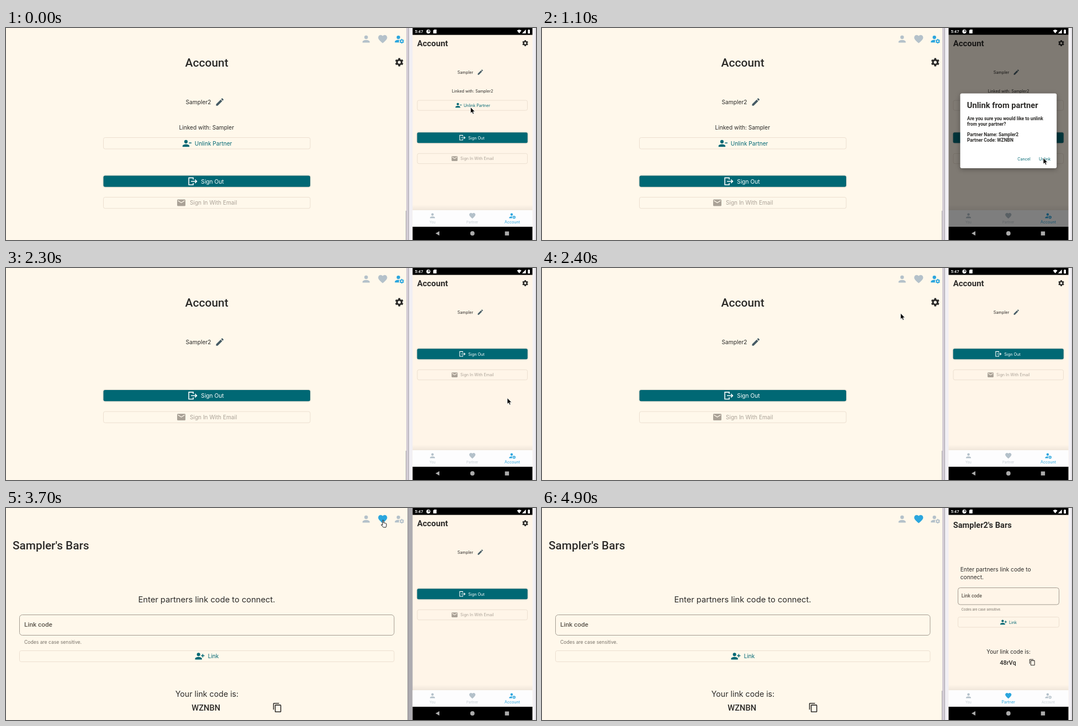
Write an HTML page that moves like this. It is 960x384 px and loops after 5.77 s.

```html
<!DOCTYPE html>
<html lang="en">
<head>
<meta charset="utf-8">
<title>Unlinking a partner</title>
<style>
  html, body { margin: 0; width: 100%; height: 100%; overflow: hidden; background: #fff8eb; }
  svg { display: block; width: 960px; height: 384px; }
  .body { font-family: Inter, "Open Sans", sans-serif; }
  .head { font-family: Roboto, Arial, sans-serif; }
  .raised { filter: drop-shadow(0 .8px .8px rgba(0, 0, 0, .3)); }
  .dialog { filter: drop-shadow(0 2px 4px rgba(0, 0, 0, .35)); }
</style>
</head>
<body>
<svg id="stage" viewBox="0 0 960 384"></svg>
<script>
const LOOP = 5770, STEP = 100;
const INK = '#2c2b29', TEAL = '#006874', BLUE = '#2ba6de', IDLE = '#b4c1ca', MUTED = '#aaa297';
const LEFT_NAME = 'Sampler2', PHONE_NAME = 'Sampler';

const path = d => `<path fill-rule="evenodd" d="${d}"/>`;
const gear = (x, y, k) => {
  const teeth = [0, 60, 120, 180, 240, 300].map(a =>
    `<rect x="-2.4" y="-10" width="4.8" height="4" rx=".6" transform="rotate(${a})"/>`).join('');
  return `<g transform="translate(${x} ${y}) scale(${k})">${teeth}
    <circle r="5.6" fill="none" stroke="currentColor" stroke-width="4.2"/></g>`;
};

// Icons live on a 24 unit grid
const ICONS = {
  person: path('M12 4a4 4 0 0 1 0 8 4 4 0 0 1 0-8zM12 14c4.42 0 8 1.79 8 4v2H4v-2c0-2.21 3.58-4 8-4z'),
  heart: path('M12 21.35l-1.45-1.32C5.4 15.36 2 12.27 2 8.5 2 5.41 4.42 3 7.5 3c1.74 0 3.41.81 4.5 2.08C13.09 3.81 14.76 3 16.5 3 19.58 3 22 5.41 22 8.5c0 3.77-3.4 6.86-8.55 11.53z'),
  account: path('M10 4a4 4 0 0 1 0 8 4 4 0 0 1 0-8zM10 14c.8 0 1.5 0 2.2.2a6 6 0 0 0-.4 5.8H2v-2c0-2.2 3.6-4 8-4z') + gear(17.8, 17, .52),
  gear: gear(12, 12, 1),
  pencil: path('M20.71 7.04c.39-.39.39-1.04 0-1.41l-2.34-2.34c-.37-.39-1.02-.39-1.41 0l-1.84 1.83 3.75 3.75zM3 17.25V21h3.75L17.81 9.93l-3.75-3.75z'),
  mail: path('M20 8l-8 5-8-5V6l8 5 8-5zM20 4H4a2 2 0 0 0-2 2v12a2 2 0 0 0 2 2h16a2 2 0 0 0 2-2V6a2 2 0 0 0-2-2z'),
  minus: path('M14 8a4 4 0 1 0-8 0 4 4 0 0 0 8 0zM17 10v2h6v-2zM2 18v2h16v-2c0-2.66-5.33-4-8-4s-8 1.34-8 4z'),
  plus: path('M13 8a4 4 0 1 0-8 0 4 4 0 0 0 8 0zM15 10v2h3v3h2v-3h3v-2h-3V7h-2v3zM1 18v2h16v-2c0-2.66-5.33-4-8-4s-8 1.34-8 4z'),
  logout: '<path fill="none" stroke="currentColor" stroke-width="2" d="M13 8V4H3v16h10v-4M8 12h13M17 8l4 4-4 4"/>',
  copy: path('M19 21H8V7h11zM19 5H8a2 2 0 0 0-2 2v14a2 2 0 0 0 2 2h11a2 2 0 0 0 2-2V7a2 2 0 0 0-2-2zM16 1H4a2 2 0 0 0-2 2v14h2V3h12z')
};

const icon = (name, x, y, size, color, id = '') =>
  `<g ${id && `id="${id}"`} style="color:${color}" fill="currentColor"
    transform="translate(${x - size / 2} ${y - size / 2}) scale(${size / 24})">${ICONS[name]}</g>`;

const text = (str, x, y, size, { color = INK, anchor = 'start', font = 'body', weight = 400, id = '' } = {}) =>
  `<text ${id && `id="${id}"`} class="${font}" x="${x}" y="${y}" font-size="${size}" font-weight="${weight}"
    text-anchor="${anchor}" fill="${color}">${str}</text>`;
const mid = (str, x, y, size, opts) => text(str, x, y, size, { anchor: 'middle', ...opts });
const head = (str, x, y, size, weight = 500, opts) => text(str, x, y, size, { font: 'head', weight, ...opts });

const rect = (x, y, w, h, fill, extra = '') =>
  `<rect x="${x}" y="${y}" width="${w}" height="${h}" fill="${fill}" ${extra}/>`;
const outline = (x, y, w, h, color = '#ecdfd0', r = 3) =>
  rect(x, y, w, h, 'none', `rx="${r}" stroke="${color}"`);
const group = (id, content, extra = '') => `<g id="${id}" ${extra}>${content}</g>`;

const leftAccount = group('leftAccount',
  head('Account', 324.5, 70, 21) + icon('gear', 712.3, 62, 18, INK) +
  mid(LEFT_NAME, 348.5, 137.8, 10.2) + icon('pencil', 387.3, 134, 18, '#455a64') +
  group('leftLinked',
    mid(`Linked with: ${PHONE_NAME}`, 363.3, 183.8, 10.1) +
    outline(176.5, 198.5, 374.5, 20.5) + icon('minus', 327.5, 209, 18.5, TEAL) +
    mid('Unlink Partner', 375.5, 212.8, 10.1, { color: TEAL })) +
  group('leftButtons',
    rect(176.5, 267.5, 374.5, 20.3, TEAL, 'rx="3" class="raised"') +
    icon('logout', 338.3, 277.7, 19, '#fff') + mid('Sign Out', 374, 281.7, 10.2, { color: '#fff' }) +
    outline(176.5, 306.5, 374.5, 20.3) + icon('mail', 317.5, 316.6, 18, MUTED) +
    mid('Sign In With Email', 375.7, 320.4, 10.1, { color: MUTED })));

const leftPartner = group('leftPartner',
  head(`${PHONE_NAME}'s Bars`, 12, 75, 20.8) +
  mid('Enter partners link code to connect.', 363.5, 170.6, 14.7) +
  outline(24.5, 193.5, 678.5, 37, '#a29b90', 5) + head('Link code', 33, 215.3, 11.8, 500, { color: '#5d574e' }) +
  text('Codes are case sensitive.', 33, 246, 8.6, { color: '#787269' }) +
  outline(24.5, 258.5, 678.5, 20) + icon('plus', 351, 268.3, 18.5, TEAL) +
  mid('Link', 375.5, 272.1, 10.1, { color: TEAL }) +
  mid('Your link code is:', 364, 341.8, 14.2) +
  head('WZNBN', 362.3, 366.7, 14.7, 500, { anchor: 'middle' }) + icon('copy', 491.5, 361.5, 18.5, INK));

const leftNav =
  '<clipPath id="bar"><rect width="726" height="41"/></clipPath>' +
  group('hover', '<circle cx="682.5" cy="20" r="25.5" fill="#000" opacity=".035"/>', 'clip-path="url(#bar)"') +
  icon('person', 652.3, 20, 19.5, IDLE) + icon('heart', 682.3, 20, 19.5, IDLE, 'leftHeart') +
  icon('account', 712.3, 20, 19, BLUE, 'leftCog');

const frameEdges =
  group('restEdge',
    rect(725, 0, 12, 384, '#f1eff4') + rect(725, 0, 4.5, 384, '#d3ccd5') +
    rect(729, 0, 1, 384, '#aaa5ae') + rect(724, 331, 1, 53, '#aaa')) +
  group('focusEdge', rect(727.5, 0, 9.5, 384, '#adabb0') + rect(727.5, 0, 1.2, 384, '#8f8c92')) +
  rect(953.5, 0, 6.5, 384, '#f3f1f5') + rect(958.5, 0, 1.5, 384, '#dedbe1');

const phoneAccount = group('phoneAccount',
  head('Account', 744.8, 32.5, 14.9, 700) + icon('gear', 940.5, 27.5, 13, INK) +
  mid(PHONE_NAME, 832, 82.6, 7.3) + icon('pencil', 859.2, 80, 12.5, '#455a64') +
  group('phoneLinked',
    mid(`Linked with: ${LEFT_NAME}`, 845, 116.9, 7.15) +
    outline(745, 131, 199.5, 18.2) + icon('minus', 819.5, 140, 13, TEAL) +
    mid('Unlink Partner', 853, 142.7, 7.15, { color: TEAL }) +
    rect(745, 131, 199.5, 18.2, TEAL, 'id="unlinkPress" rx="3" opacity="0"')) +
  group('phoneButtons',
    rect(744.7, 189.3, 200, 18.9, TEAL, 'rx="2.5" class="raised"') +
    icon('logout', 826.7, 198.7, 13, '#fff') + mid('Sign Out', 852, 201.5, 7.25, { color: '#fff' }) +
    outline(745, 227.3, 199.5, 18.4) + icon('mail', 812.5, 236.6, 13, MUTED) +
    mid('Sign In With Email', 853.3, 239.3, 7.15, { color: MUTED })));

const phonePartner = group('phonePartner',
  head(`${LEFT_NAME}'s Bars`, 744.8, 36.2, 14.6, 700) +
  text('Enter partners link code to', 757.7, 115, 10.25) + text('connect.', 757.7, 128.6, 10.25) +
  outline(753.5, 144.5, 183, 30.5, '#a29b90', 4) + head('Link code', 759.7, 162.4, 8.6, 500, { color: '#5d574e' }) +
  text('Codes are case sensitive.', 759.7, 185.7, 5.95, { color: '#787269' }) +
  outline(753.5, 197.5, 183, 18.5) + icon('plus', 836, 206.8, 13, TEAL) +
  mid('Link', 853, 209.5, 7.15, { color: TEAL }) +
  mid('Your link code is:', 845, 263.5, 9.9) +
  head('48rVq', 844, 283.8, 11, 500, { anchor: 'middle' }) + icon('copy', 888, 279.5, 12.5, INK));

const phoneNav =
  '<linearGradient id="shade" x2="0" y2="1"><stop stop-opacity="0"/><stop offset="1" stop-opacity=".06"/></linearGradient>' +
  rect(736.5, 320, 217, 10, 'url(#shade)') + rect(736.5, 330, 217, 30, '#fdfdfe') +
  '<circle id="tabPress" cx="844.5" cy="345" r="14" fill="#2ba6de" opacity="0"/>' +
  icon('person', 772.5, 340, 13.5, IDLE) + mid('You', 772.5, 354, 6.1, { color: '#c3ccd2' }) +
  icon('heart', 844.7, 340, 13.5, IDLE, 'phoneHeart') + mid('Partner', 844.7, 354, 6.1, { id: 'partnerLabel' }) +
  icon('account', 917, 340, 13.5, BLUE, 'phoneCog') + mid('Account', 917, 354, 7.1, { id: 'accountLabel' });

const dialogLines = [
  ['Are you sure you would like to unlink', 166.6], ['from your partner?', 176.6],
  [`Partner Name: ${LEFT_NAME}`, 196.2], ['Partner Code: WZNBN', 205.7]
].map(([str, y]) => head(str, 770, y, 8.4, 700)).join('');
const dialog = group('dialog',
  rect(736.5, 12.5, 217, 347.5, '#000', 'opacity=".5"') +
  rect(757.5, 118.5, 174.7, 135.5, '#fff', 'rx="3" class="dialog"') +
  head('Unlink from partner', 769.8, 144.8, 14.7, 700) + dialogLines +
  '<circle id="confirmPress" cx="910.5" cy="237.5" r="10" fill="#006874" opacity="0"/>' +
  mid('Cancel', 873, 239.8, 7.2, { color: TEAL }) + mid('Unlink', 910.7, 239.8, 7.2, { color: TEAL }));

const systemBars =
  rect(736.5, 0, 217, 12.5, '#000') + rect(736.5, 360, 217, 24, '#000') +
  head('5:47', 740.5, 9.2, 7.6, 500, { color: '#fff' }) +
  '<circle cx="765" cy="6.3" r="3.6" fill="#fff"/><path d="M765 4v2.6h2.4a2.4 2.4 0 0 0-2.4-2.6z"/>' +
  '<path fill="#fff" d="M775.6 2.8h4.2v7h-6V4.6zM925.6 4.4q4-3 8 0l-4 5.4zM941.7 2.8v7h-7zM945.2 3.6h1v-.9h1.8v.9h1v6.3h-3.8z"/>' +
  '<path fill="#aaa" d="M785 368v8l-7-4zM903.7 368.4h7.4v7.4h-7.4z"/><circle cx="844.8" cy="372" r="3.9" fill="#aaa"/>';

const cursors =
  group('arrow', '<path d="M0 0V10.8L2.5 8.6 4.2 12.4 6 11.6 4.4 7.9H7.8Z" stroke="#fff" stroke-width=".7"/>') +
  group('hand', '<path d="M-1 9V1Q-1 0 0 0T1 1V5Q2 4.3 3 5.3 4 4.8 4.6 5.9 6 5.5 6 7V10Q6 11.5 5 13H.5L-3.5 8.5Q-3 7-1 9Z" fill="#fff" stroke="#000" stroke-width=".9"/>');

document.getElementById('stage').innerHTML =
  rect(0, 0, 960, 384, '#fff8eb') + leftNav + leftAccount + leftPartner + frameEdges +
  rect(736.5, 0, 217, 384, '#fff5e8') + phoneAccount + phonePartner + phoneNav + dialog + systemBars + cursors;

// Each track is a list of [time, ...value] that holds until the next entry
const CURSOR = [
  [0, 841.5, 143.5, 'arrow'], [800, 856, 164, 'arrow'], [900, 884, 203, 'arrow'],
  [1000, 903, 229, 'arrow'], [1100, 908, 235.5, 'arrow'],
  [2400, 649.5, 82, 'arrow'], [2500, 664, 55, 'arrow'], [2600, 678, 30, 'hand'], [2700, 683, 22, 'hand'],
  [3900, 698, 52, 'arrow'], [4000, 752, 160, 'arrow'], [4100, 822, 296, 'arrow'],
  [4200, 843.3, 337.5, 'arrow'], [4900, 0, 0, 'none']
];
const OPACITY = {
  unlinkPress: [[0, 0], [100, .08], [300, 0]],
  dialog: [[0, 0], [200, .4], [300, .85], [400, 1], [1900, .8], [2000, .35], [2100, 0]],
  confirmPress: [[0, 0], [1800, .13]],
  phoneLinked: [[0, 1], [2100, 0]],
  leftLinked: [[0, 1], [2200, 0]],
  hover: [[0, 0], [2600, 1], [3700, 0]],
  focusEdge: [[0, 0], [2700, 1], [4100, 0]],
  restEdge: [[0, 1], [2700, 0], [4100, 1]],
  leftAccount: [[0, 1], [3500, 0]],
  leftPartner: [[0, 0], [3500, 1]],
  tabPress: [[0, 0], [4400, .1], [4600, 0]],
  phoneAccount: [[0, 1], [4500, 0]],
  phonePartner: [[0, 0], [4500, 1]]
};

const el = id => document.getElementById(id);
const at = (track, t) => track.findLast(([start]) => start <= t).slice(1);
const moveUp = (id, dy) => el(id).setAttribute('transform', `translate(0 ${-dy})`);
const tint = (id, active) => { el(id).style.color = active ? BLUE : IDLE; };
const label = (id, active) => {
  el(id).setAttribute('font-size', active ? 7.1 : 6.1);
  el(id).setAttribute('fill', active ? BLUE : '#c3ccd2');
};

function draw(now) {
  const t = Math.floor((now % LOOP) / STEP) * STEP;
  for (const id in OPACITY) el(id).setAttribute('opacity', at(OPACITY[id], t)[0]);

  moveUp('leftButtons', t < 2200 ? 0 : 46.5);
  moveUp('phoneButtons', t < 2100 ? 0 : 43);

  const leftOnPartner = t >= 3500, phoneOnPartner = t >= 4500;
  tint('leftHeart', leftOnPartner);
  tint('leftCog', !leftOnPartner);
  tint('phoneHeart', phoneOnPartner);
  tint('phoneCog', !phoneOnPartner);
  label('partnerLabel', phoneOnPartner);
  label('accountLabel', !phoneOnPartner);

  const [x, y, shape] = at(CURSOR, t);
  for (const id of ['arrow', 'hand']) {
    el(id).setAttribute('transform', `translate(${x} ${y})`);
    el(id).setAttribute('opacity', id === shape ? 1 : 0);
  }
}

const start = performance.now();
function tick() {
  draw(performance.now() - start);
  requestAnimationFrame(tick);
}
tick();
</script>
</body>
</html>
```
